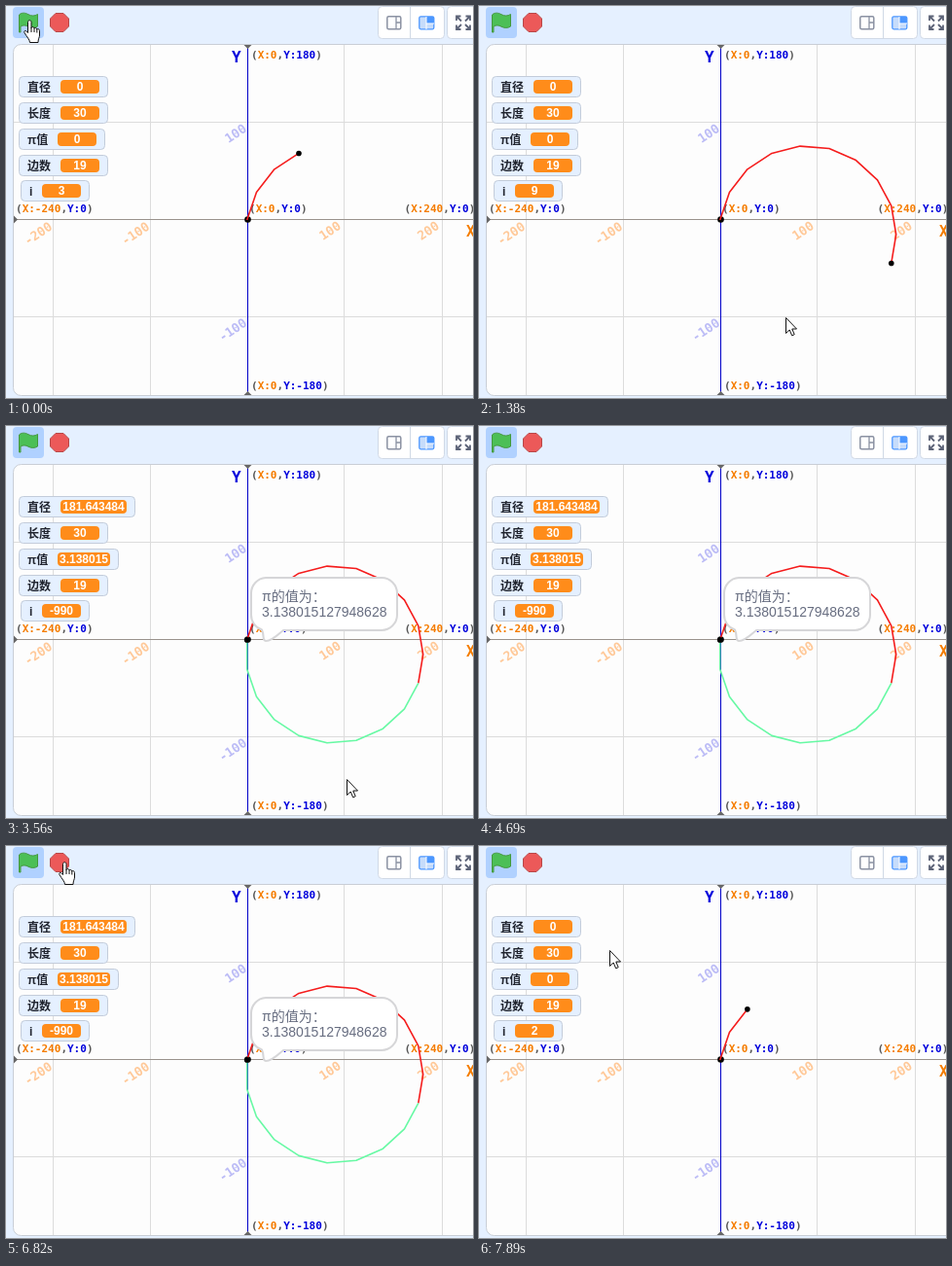
Animation, 480 px wide and 403 px high, one loop 8 s. Source, as an HTML page:

```html
<!DOCTYPE html>
<html lang="zh">
<head>
<meta charset="utf-8">
<title>Polygon and π</title>
<style>
html, body { margin: 0; width: 100%; height: 100%; overflow: hidden; background: #e5f0ff; }
svg { display: block; }
.mono { font: bold 11px "DejaVu Sans Mono", monospace; fill: #555; }
.x { fill: #f57c00; }
.y { fill: #0000dc; }
.tick { font-size: 13px; text-anchor: middle; }
.name { font: bold 12px "Liberation Sans", "Noto Sans CJK SC", "Noto Sans CJK", sans-serif; fill: #20242e; }
.value { font: bold 12px "Liberation Sans", sans-serif; fill: #fff; text-anchor: middle; }
.say { font: 14px "Liberation Sans", "Noto Sans CJK SC", "Noto Sans CJK", sans-serif; fill: #676d80; }
</style>
</head>
<body>
<svg id="stage" width="480" height="403" viewBox="0 0 480 403">
  <rect width="480" height="403" fill="#e5f0ff"/>

  <rect id="flagBg" x="7" y="1" width="32" height="32" rx="4"/>
  <path d="M14 8.5C17 6.5 20 7 23 8.7S29.500 10.500 32.500 8.500V21C29.500 23 26 22.800 23 21.200S17.500 19.500 15 21V27H13.500V9Z"
        fill="#4cbf56" stroke="#45993d" stroke-linejoin="round"/>
  <path id="stop" d="M51 7.500H59L64.500 13V21L59 26.500H51L45.500 21V13Z" fill="#ec5959" stroke="#b84848" stroke-linejoin="round"/>

  <g stroke="#d0d9e6">
    <rect x="382.500" y=".5" width="68" height="33" rx="4" fill="#fff"/>
    <rect x="453.500" y=".5" width="40" height="33" rx="4" fill="#fff"/>
    <path d="M415.500 1V33"/>
  </g>
  <rect x="391.800" y="10.800" width="14" height="13" rx="1.500" fill="#fff" stroke="#8b92a3" stroke-width="1.500"/>
  <path d="M401 11V17H406M401 17V23.500" fill="none" stroke="#8b92a3" stroke-width="1.300"/>
  <rect x="424.800" y="10.800" width="15" height="13" rx="1.500" fill="#c6dcfb" stroke="#4c97ff" stroke-width="1.300"/>
  <path d="M432 11H440V18H432Z" fill="#4c97ff"/>
  <path d="M432 11V24M432 18H440" stroke="#fff"/>
  <path d="M463 15V10.500H467.500M463.500 11L468 15.500M472.500 10.500H477V15M476.500 11L472 15.500M463 19.500V24H467.500M463.500 23.500L468 19M477 19.500V24H472.500M476.500 23.500L472 19"
        fill="none" stroke="#5c6377" stroke-width="1.800"/>

  <path d="M481 39.500H15.500a8 8 0 0 0-8 8V392.500a8 8 0 0 0 8 8H481" fill="#fdfdfd" stroke="#c9ced6"/>
  <path d="M48.500 40V400M148.500 40V400M347.500 40V400M448.500 40V400M8 119.500H480M8 319.500H480" stroke="#dcdcdc"/>
  <path d="M8 219.500H480" stroke="#9a928c"/>
  <path d="M248.500 40V400" stroke="#0000c8"/>
  <path d="M244.500 40H252.500L248.500 44ZM244.500 400H252.500L248.500 396ZM8 215.500V223.500L12 219.500Z" fill="#666"/>
  <g id="labels"></g>
  <circle cx="248.500" cy="219.500" r="3.300"/>

  <g fill="none" stroke-width="1.600" stroke-linejoin="round">
    <polyline id="red" stroke="#f51d1d"/>
    <polyline id="green" stroke="#67f9a4"/>
  </g>
  <circle id="pen" r="2.800"/>
  <g id="monitors"></g>

  <g id="bubble">
    <path d="M267 156H386a16 16 0 0 1 16 16V194a16 16 0 0 1-16 16H285C280 214 274 221 267 221C263 221 266 216 263 209.500A16 16 0 0 1 252 194V172a16 16 0 0 1 15-16Z"
          fill="#fff" stroke="#d6d6d8" stroke-width="2"/>
    <text class="say" x="263" y="180">π的值为：</text>
    <text class="say" x="263" y="196">3.138015127948628</text>
  </g>

  <path id="arrow" d="M.5.5V16.500L4.200 13L6.700 18.800L9.200 17.700L6.800 12H11.500Z" fill="#fff" stroke="#111"/>
  <path id="hand" d="M4.500 2.500C4.500.2 8 .2 8 2.500V8.500C8.500 7 11 7.300 11 9C11.600 8 13.800 8.300 13.800 10C14.500 9.200 16.500 9.600 16.500 11.500V16C16.500 18.500 15 19.500 15 23.500H6.500C6.500 20.500 3.500 18 1 13.500C0 11.300 2.300 10.500 4.500 13.500Z M8 8V13M11 9V13M13.800 10V13.500"
        fill="#fff" stroke="#111" stroke-linejoin="round"/>
</svg>
<script>
const LOOP = 8000;
const SIDES = 19, LENGTH = 30, HALF = 10;
const $ = id => document.getElementById(id);

function add(parent, tag, attrs, text) {
  const el = document.createElementNS("http://www.w3.org/2000/svg", tag);
  for (const key in attrs) el.setAttribute(key, attrs[key]);
  if (text !== undefined) el.textContent = text;
  return parent.appendChild(el);
}

// Coordinate labels
function coord(left, base, x, y) {
  const text = add($("labels"), "text", { class: "mono", x: left, y: base });
  add(text, "tspan", {}, "(");
  add(text, "tspan", { class: "x" }, "X:" + x);
  add(text, "tspan", {}, ",");
  add(text, "tspan", { class: "y" }, "Y:" + y);
  add(text, "tspan", {}, ")");
}
function tick(cx, cy, label, fill) {
  add($("labels"), "text", {
    class: "mono tick", y: 4.5, style: "fill:" + fill,
    transform: `translate(${cx} ${cy}) rotate(-34)`
  }, label);
}
coord(252, 54, 0, 180);
coord(252, 394, 0, -180);
coord(250, 212, 0, 0);
coord(10, 212, -240, 0);
coord(409.5, 212, 240, 0);
const violet = "#bcbcf6", peach = "#ffc999";
tick(236, 131, "100", violet);
tick(233, 333, "-100", violet);
tick(33, 234, "-200", peach);
tick(133, 234, "-100", peach);
tick(333, 231, "100", peach);
tick(434, 231, "200", peach);
add($("labels"), "text", { class: "mono y", x: 232, y: 58, style: "font-size:16px" }, "Y");
add($("labels"), "text", { class: "mono x", x: 473, y: 237, style: "font-size:15px" }, "X");

// Variable monitors
function monitor(label, left, top, pillX) {
  const g = add($("monitors"), "g", { transform: `translate(0 ${top})` });
  const box = add(g, "rect", { x: left + .5, y: .5, height: 21, rx: 4, fill: "#e5f0ff", stroke: "#c3ccda" });
  add(g, "text", { class: "name", x: left + 9, y: 15.5 }, label);
  const pill = add(g, "rect", { x: pillX, y: 4, height: 14, rx: 4, fill: "#ff8c1a" });
  const value = add(g, "text", { class: "value", y: 15.3 });
  return (text, width = 40) => {
    box.setAttribute("width", pillX + width + 8 - left);
    pill.setAttribute("width", width);
    value.setAttribute("x", pillX + width / 2);
    value.textContent = text;
  };
}
const showDiameter = monitor("直径", 13, 72, 56);
const showLength = monitor("长度", 13, 99, 56);
const showPi = monitor("π值", 13, 126, 53);
const showSides = monitor("边数", 13, 153, 56);
const showIndex = monitor("i", 15, 179, 37);
showLength(LENGTH);
showSides(SIDES);

// Polygon corners: turn, then move
const corners = [[247.7, 219.9]];
for (let k = 1; k <= SIDES; k++) {
  const [x, y] = corners[k - 1], a = 2 * Math.PI * k / SIDES;
  corners.push([x + LENGTH * Math.sin(a), y - LENGTH * Math.cos(a)]);
}

// [time, sides drawn]
const drawn = [
  [0, 3], [150, 4], [270, 5], [420, 6], [840, 7], [1080, 8], [1230, 9], [1380, 10],
  [1650, 11], [1800, 12], [2050, 13], [2360, 14], [2510, 15], [2780, 16],
  [2900, 17], [3050, 18], [3290, 19], [7610, 1], [7890, 2]
];
// [time, cursor, x, y]
const pointer = [
  [0, "hand", 18, 14], [150, "arrow", 110, 88], [270, "arrow", 228, 172],
  [420, "arrow", 262, 214], [540, "arrow", 277, 238], [690, "arrow", 282, 266],
  [840, "arrow", 298, 296], [960, "arrow", 311, 314], [1080, "arrow", 315, 320],
  [1500, "arrow", 343, 358], [1650, "arrow", 349, 361], [2510, "arrow", 349, 362],
  [3050, "arrow", 350, 363], [3840, "arrow", 351, 363], [4270, "arrow", 362, 371],
  [4390, "arrow", 374, 382], [4540, "arrow", 386, 395], [4690, "none", 0, 0],
  [6280, "arrow", 72, 53], [6400, "arrow", 67, 35], [6550, "hand", 56, 18],
  [6670, "hand", 54, 16], [7090, "hand", 40, 15], [7210, "hand", 24, 14],
  [7330, "hand", 18, 14], [7890, "arrow", 134, 107]
];
const flagTint = [[0, "#b0d1ff"], [6970, "none"], [7210, "#cee3ff"], [7610, "#b0d1ff"]];

const at = (table, t) => table.findLast(row => row[0] <= t);
const points = (from, to) => corners.slice(from, to).map(p => p.join()).join(" ");

function render(t) {
  const n = at(drawn, t)[1];
  const second = t >= 1650 && t < 7610;
  const solved = t >= 3560 && t < 7610;

  $("red").setAttribute("points", points(0, Math.min(n, HALF) + 1));
  $("green").setAttribute("points", n > HALF ? points(HALF, n + 1) : "");
  $("pen").setAttribute("cx", corners[n][0]);
  $("pen").setAttribute("cy", corners[n][1]);

  showDiameter(second ? "181.643484" : 0, second ? 68 : 40);
  showPi(solved ? "3.138015" : 0, solved ? 54 : 40);
  showIndex(second ? n - 1009 : t >= 1380 && t < 1500 ? 9 : n);

  const running = t < 6970 || t >= 7610;
  $("bubble").style.display = solved && running ? "" : "none";
  $("stop").style.opacity = running ? 1 : .5;
  $("flagBg").setAttribute("fill", at(flagTint, t)[1]);

  const [, kind, x, y] = at(pointer, t);
  for (const id of ["arrow", "hand"]) {
    $(id).style.display = id === kind ? "" : "none";
    $(id).setAttribute("transform", `translate(${x} ${y})`);
  }
}

const start = performance.now();
function tickFrame(now) {
  render(Math.max(0, now - start) % LOOP);
  requestAnimationFrame(tickFrame);
}
render(0);
requestAnimationFrame(tickFrame);
</script>
</body>
</html>
```
